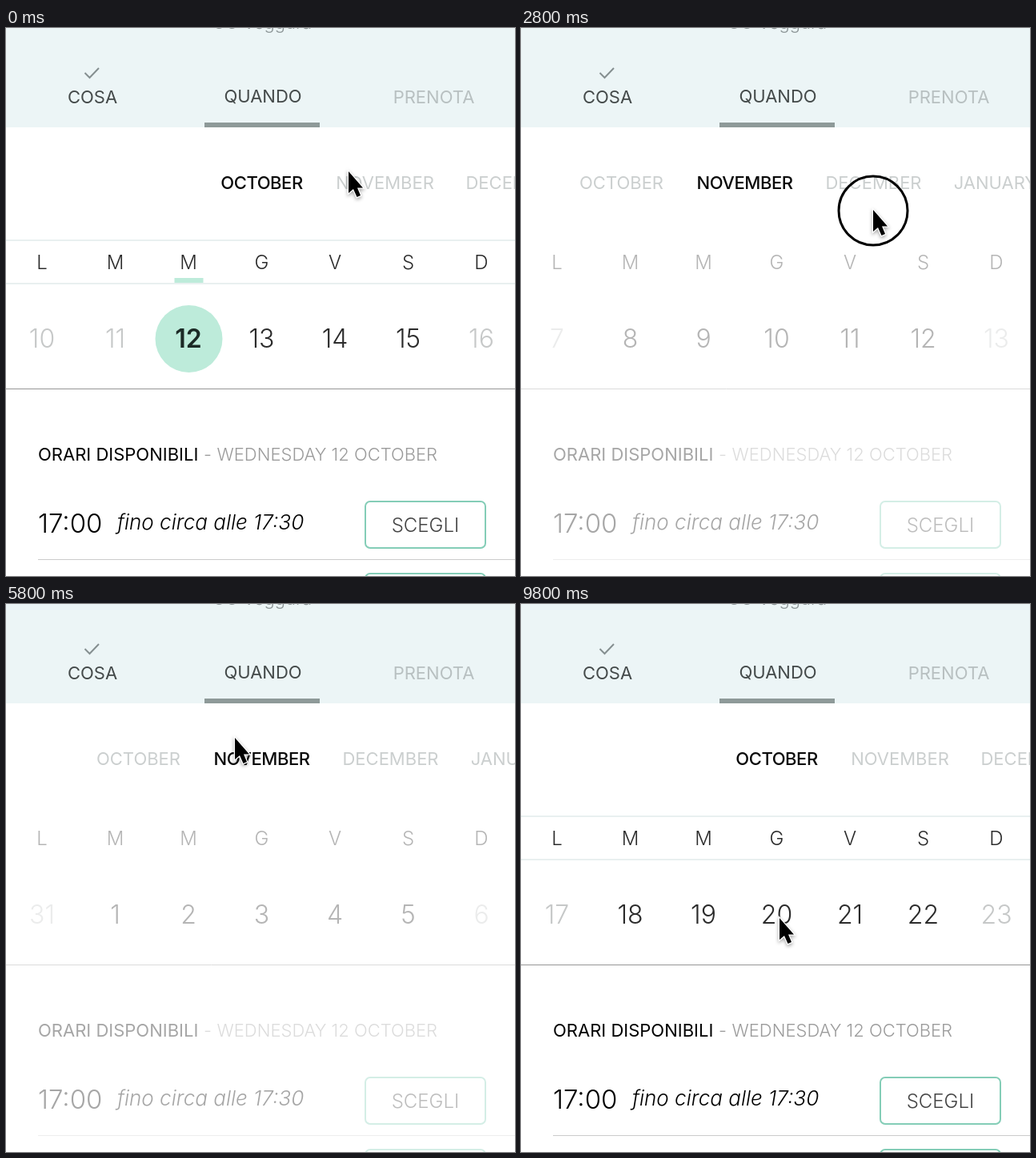
Write an HTML page that moves like this. It is 636 px wide and 684 px high and loops after 9.9 s.

```html
<!DOCTYPE html>
<html lang="it">
<head>
<meta charset="utf-8">
<style>
  html, body { margin: 0; width: 100%; height: 100%; overflow: hidden; background: #fff; }
  svg { display: block; font: 400 22px Inter, sans-serif; }
  .mid { text-anchor: middle; }
  .light { font-weight: 300; }
  .month { fill: #cbcfcf; }
  .month.on { fill: #0a0a0a; font-weight: 500; letter-spacing: -.02em; }
  .letter { font-size: 24px; font-weight: 300; fill: #2b2b2b; }
  .day { font-size: 32px; font-weight: 300; fill: #2b2b2b; }
  .day.off { fill: #c6c8c8; }
  .day.picked { font-weight: 600; fill: #1c2a26; }
  .button { fill: none; stroke: #84cdb7; stroke-width: 2; }
  #arrow { filter: drop-shadow(0 2px 2px rgba(0, 0, 0, .35)); }
</style>
</head>
<body>
<svg width="636" height="684" viewBox="0 0 636 684">
  <rect width="636" height="124" fill="#ecf5f6"/>
  <text class="mid light" x="320" y="1" fill="#8d9697">CC Veggura</text>
  <path d="M98.500 56l6 6 11.500-12" fill="none" stroke="#858f90" stroke-width="2"/>
  <text class="mid" x="108" y="94" fill="#444a4a">COSA</text>
  <text class="mid" x="321" y="93" fill="#444a4a">QUANDO</text>
  <text class="mid" x="534.500" y="94" fill="#b8c0c1">PRENOTA</text>
  <rect x="248" y="118" width="144" height="6" fill="#8e9a99"/>

  <g id="months"></g>
  <path id="rules" d="M0 265H636M0 319H636" stroke="#e9f0f0" stroke-width="2"/>

  <g id="content">
    <g id="days">
      <g id="mark" fill="#bdebda">
        <rect x="-18" y="312" width="36" height="6"/>
        <circle cy="388" r="42"/>
      </g>
    </g>
    <path d="M0 450.500H636" stroke="#979797"/>
    <text x="40" y="540">ORARI DISPONIBILI</text>
    <text class="light" x="247" y="540" fill="#9b9b9b">-</text>
    <text class="light" x="263.500" y="540" fill="#9b9b9b">WEDNESDAY 12 OCTOBER</text>
    <text class="light" x="40" y="629.500" font-size="33">17:00</text>
    <text class="light" x="139" y="626" font-size="26" font-style="italic">fino circa alle 17:30</text>
    <rect class="button" x="449" y="591" width="150" height="58" rx="6"/>
    <text class="mid light" x="524" y="629" font-size="24" fill="#444">SCEGLI</text>
    <path d="M40 663.500H636" stroke="#cbcbcb"/>
    <rect class="button" x="449" y="681" width="150" height="58" rx="6"/>
  </g>

  <g id="cursor">
    <circle id="ring" r="43" fill="none" stroke="#000" stroke-width="3"/>
    <path id="arrow" d="M0-1V26L6 21 10.500 31 15 29 11 19.500H18Z"
      stroke="#fff" stroke-width="2.500" paint-order="stroke"/>
  </g>
</svg>
<script>
const LOOP = 9900, STEP = 100, PITCH = 91.5, PICKED = 11, DIMMED = .35;
const $ = id => document.getElementById(id);

function addText(parent, x, y, className, content) {
  const node = document.createElementNS("http://www.w3.org/2000/svg", "text");
  node.setAttribute("x", x);
  node.setAttribute("y", y);
  node.setAttribute("class", "mid " + className);
  node.textContent = content;
  return parent.appendChild(node);
}

const months = Object.entries({
  OCTOBER: 0, NOVEMBER: 154, DECEMBER: 315, JANUARY: 467, FEBRUARY: 615, MARCH: 752
}).map(([name, offset]) => ({ offset, node: addText($("months"), 319.5 + offset, 200.5, "month", name) }));
const [october, november, , january] = months;

// Days are counted from the first of October.
for (let index = 0; index < 110; index++) {
  const date = new Date(2016, 9, 1 + index), weekday = date.getDay(), x = index * PITCH;
  const look = index === PICKED ? "picked" : weekday < 2 || index < PICKED ? "off" : "";
  addText($("days"), x, 301, "letter", "DLMMGVS"[weekday]);
  addText($("days"), x, 399, "day " + look, date.getDate());
}

// Each drag ends on a month and on the week that starts with the given day.
const drags = [
  { start: 500, end: 1400, x: 356, y: 188, dx: -176, month: november, day: 37 },
  { start: 2600, end: 3494, x: 480, y: 228, dx: -313, month: january, day: 86 },
  { start: 4700, end: 5200, x: 130, y: 188, dx: 313, month: november, day: 30 },
  { start: 7000, end: 7300, x: 70, y: 405, dx: 260, month: october, day: 23, week: true },
  { start: 8000, end: 8400, x: 100, y: 400, dx: 320, month: october, day: 16, week: true }
];
const pauses = [[0, 428, 180], [4500, 247, 386], [5800, 286, 168], [7500, 278, 410], [9200, 323, 393]];
const path = drags
  .flatMap(({ start, end, x, y, dx }) => [[start, x, y], [end, x + dx, y], [end + 100, x + dx, y]])
  .concat(pauses)
  .sort((a, b) => a[0] - b[0]);

function ease(t, start, duration) {
  const u = Math.min(1, Math.max(0, (t - start) / duration));
  return u * u * (3 - 2 * u);
}

function pointerAt(t) {
  const next = path.findIndex(point => point[0] > t);
  if (next < 0) return path[path.length - 1].slice(1);
  const [from, x, y] = path[next - 1], [to, x2, y2] = path[next];
  const k = ease(t, from, to - from);
  return [x + (x2 - x) * k, y + (y2 - y) * k];
}

const move = (id, x, y = 0) => $(id).setAttribute("transform", `translate(${x} ${y})`);

function draw(t) {
  let shift = 0, day = 9, clear = 1, pressed = false;
  for (const drag of drags) {
    const { start, end, dx, month, week } = drag;
    if (!week) {
      shift -= dx * ease(t, start, end - start);
      clear *= 1 - ease(t, start, 200) + ease(t, end + 907, 320);
    }
    shift += (month.offset - shift) * ease(t, week ? end + 600 : end, 300);
    day += (drag.day - day) * (week ? ease(t, start, 951) : ease(t, start + 380, 652));
    pressed ||= t >= start - 100 && t <= end + 50;
  }
  const distance = month => Math.abs(month.offset - shift);
  const active = months.reduce((a, b) => distance(b) < distance(a) ? b : a);
  for (const month of months) month.node.classList.toggle("on", month === active);
  move("months", -shift);
  move("days", 45 - day * PITCH);
  move("cursor", ...pointerAt(t));
  $("content").setAttribute("opacity", DIMMED + (1 - DIMMED) * clear);
  $("rules").setAttribute("opacity", clear);
  $("ring").setAttribute("visibility", pressed ? "visible" : "hidden");
}

move("mark", PICKED * PITCH + .5);
const start = performance.now();
function tick() {
  const t = (performance.now() - start) % LOOP;
  draw(Math.floor(t / STEP) * STEP);
  requestAnimationFrame(tick);
}
tick();
</script>
</body>
</html>
```
